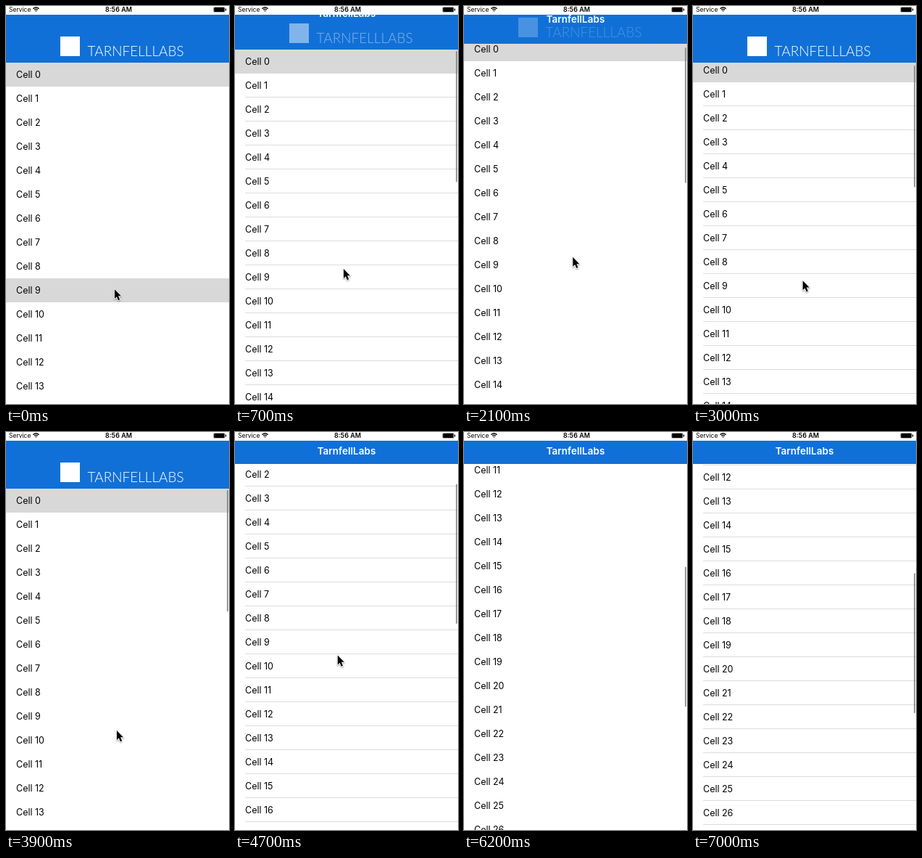
An HTML page with a canvas for the animation above (7.1 s loop, 308 by 548 pixels).

```html
<!DOCTYPE html>
<html lang="en">
<head>
<meta charset="utf-8">
<title>Collapsing header</title>
<style>
  html, body { margin: 0; width: 100%; height: 100%; overflow: hidden; background: #fff; }
  canvas { display: block; width: 308px; height: 548px; }
</style>
</head>
<body>
<canvas id="stage" width="308" height="548"></canvas>
<script>
const ctx = document.getElementById('stage').getContext('2d');
const W = 308, H = 548, LOOP = 7100, STEP = 100;
const STATUS = 12, HEADER_BOTTOM = 78, COLLAPSE = 34, ROW = 33, ROWS = 40;
const COAST = 143, COAST_DECAY = 500, POINTER_GONE = 6000, BAR_LINGER = 400;
const SANS = 'Inter, Roboto, sans-serif';

const easeIn = power => p => p ** power;
const easeOut = power => p => 1 - (1 - p) ** power;

// Push up, pull back down, then flick up and coast
const press = { start: 0, end: 1500, x: [150, 150], y: [390, 337], scroll: [-10, 43], ease: easeOut(1.2) };
const pull = { start: 1650, end: 3700, x: [150, 153], y: [337, 411], scroll: [43, -23.4], ease: easeIn(1.4) };
const flick = { start: 4200, end: 5400, x: [153, 121], y: [411, 115], scroll: [0, 291], ease: easeIn(1.2) };

const clamp = (v, lo, hi) => Math.min(hi, Math.max(lo, v));
const mix = ([a, b], p) => a + (b - a) * p;

function stateAt(t) {
  const drag = [flick, pull, press].find(d => t >= d.start);
  const p = drag.ease(clamp((t - drag.start) / (drag.end - drag.start), 0, 1));
  const coast = t > flick.end ? COAST * (1 - Math.exp((flick.end - t) / COAST_DECAY)) : 0;
  const scroll = Math.round(Math.max(0, mix(drag.scroll, p)) + coast);

  // The header reacts before the list whenever the drag direction turns
  const listOffset = drag === pull ? pull.scroll[0] - COLLAPSE : 0;
  return {
    scroll,
    collapse: clamp(scroll - listOffset, 0, COLLAPSE),
    pointer: [mix(drag.x, p), mix(drag.y, p)],
    pressed: drag === press && scroll === 0 ? 9 : -1,
    barVisible: scroll > 0 || (drag === pull && t < pull.end + BAR_LINGER),
  };
}

function rect(x, y, w, h, color) {
  ctx.fillStyle = color;
  ctx.fillRect(x, y, w, h);
}

function text(str, x, y, font, color, align = 'left') {
  ctx.font = font;
  ctx.fillStyle = color;
  ctx.textAlign = align;
  ctx.fillText(str, x, y);
}

function pill(x, y, w, h, r, color) {
  ctx.fillStyle = color;
  ctx.beginPath();
  ctx.roundRect(x, y, w, h, r);
  ctx.fill();
}

function drawRows(scroll, pressed) {
  const hairlines = scroll % 5 !== 0; // thin lines drop out at some pixel phases
  for (let i = 0; i < ROWS; i++) {
    const y = HEADER_BOTTOM + i * ROW - scroll;
    if (i === 0 || i === pressed) rect(0, y, W, ROW, '#d8d8d8');
    else if (hairlines) rect(14, y + ROW - 1, W - 14, 1, '#dcdcde');
    text('Cell ' + i, 14, y + 21, '12.5px ' + SANS, '#000');
  }
}

function drawHeader(collapse) {
  rect(0, 0, W, HEADER_BOTTOM - collapse, '#1170d7');
  ctx.globalAlpha = 1 - collapse / COLLAPSE;
  rect(75, 42 - collapse, 27, 27, '#fff');
  text('TARNFELLLABS', 112.5, 69 - collapse, '300 19px Lato, sans-serif', '#fff');
  ctx.globalAlpha = 1;
  text('TarnfellLabs', 154, collapse - 3.5, '600 13.5px ' + SANS, '#fff', 'center');
}

function drawStatusBar() {
  rect(0, 0, W, STATUS, '#fff');
  text('Service', 4, 8, '8.5px ' + SANS, '#000');
  text('8:56 AM', 155.5, 8, '600 9px ' + SANS, '#000', 'center');
  ctx.strokeStyle = '#000';
  ctx.lineWidth = 1.3;
  for (let r = 1; r < 6; r += 2.4) {
    ctx.beginPath();
    ctx.arc(41.5, 7.8, r, -Math.PI * 0.75, -Math.PI * 0.25);
    ctx.stroke();
  }
  pill(286.5, 1.5, 16, 7, 1.5, '#777');
  pill(287.5, 2, 14, 6, 1, '#000');
  pill(303, 3.5, 1.2, 3, 0.5, '#000');
}

function drawScrollbar(offset, collapse) {
  const top = HEADER_BOTTOM - collapse, view = H - top, content = ROWS * ROW;
  const length = view * view / content;
  const y = top + 2 + offset / (content - view) * (view - 4 - length);
  pill(305.2, y, 1.6, length, 0.8, '#808080');
}

function drawPointer(x, y) {
  ctx.save();
  ctx.translate(x, y);
  const arrow = new Path2D('M0 0V13L2.9 10.2 5 15.2 7.2 14.2 5.1 9.3H9Z');
  ctx.shadowColor = 'rgba(0,0,0,.4)';
  ctx.shadowBlur = 2;
  ctx.shadowOffsetY = 1;
  ctx.strokeStyle = '#fff';
  ctx.lineWidth = 1.8;
  ctx.lineJoin = 'round';
  ctx.stroke(arrow);
  ctx.shadowColor = 'transparent';
  ctx.fillStyle = '#000';
  ctx.fill(arrow);
  ctx.restore();
}

function draw(t) {
  const { scroll, collapse, pointer, pressed, barVisible } = stateAt(t);
  rect(0, 0, W, H, '#fff');
  drawRows(scroll, pressed);
  drawHeader(collapse);
  drawStatusBar();
  if (barVisible) drawScrollbar(scroll - collapse, collapse);
  if (t < POINTER_GONE) drawPointer(...pointer);
}

const start = performance.now();
function tick() {
  const t = (performance.now() - start) % LOOP;
  draw(Math.floor(t / STEP) * STEP);
  requestAnimationFrame(tick);
}
tick();
</script>
</body>
</html>
```
